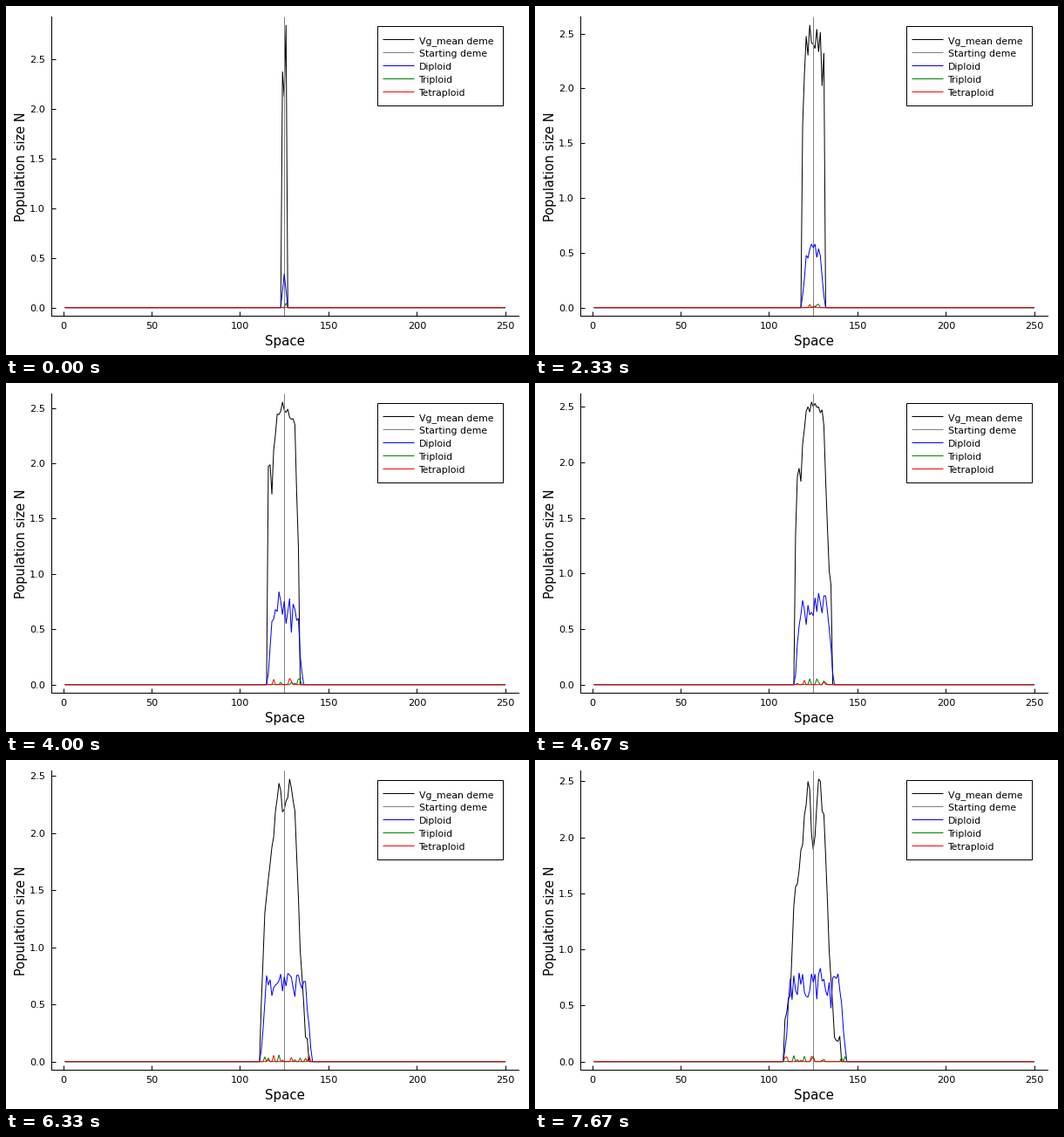
A matplotlib script that plays this animation: 600 px wide and 400 px high, repeating every 8000 ms.

```python
import matplotlib.pyplot as plt
import numpy as np
from matplotlib.animation import FuncAnimation
from matplotlib.patches import Rectangle
from matplotlib.ticker import FormatStrFormatter

W, H, DPI = 600, 400, 100
LOOP_MS, TICK_MS = 8000, 50
GENERATIONS = 24
PX = 72 / DPI
CENTRE = 125
DEMES = np.arange(1, 251)
LEFT, RIGHT, TOP, BOTTOM = 52.4, 588.1, 12, 355.4

plt.rcParams.update({
    "font.family": "DejaVu Sans",
    "font.size": 10.85 * PX,
    "path.simplify": False,
    "lines.linewidth": PX,
    "lines.solid_joinstyle": "miter",
    "lines.solid_capstyle": "butt",
})

# Highest value per generation, which also sets the y axis.
PEAK_POINTS = [(0, 2.84), (3, 2.438), (4, 2.593), (14, 2.545), (17, 2.471),
               (19, 2.472), (21, 2.557), (22, 2.434), (23, 2.521)]
# Variance across space once a deme is settled.
LANDSCAPE = [(109, 0.4), (112, 0.6), (114, 1.4), (118, 1.8), (122, 2.4),
             (125, 2.4), (129, 2.4), (131, 2.1), (134, 1.0), (137, 0.2)]

base_rng = np.random.default_rng(7)
PHASE = base_rng.uniform(0, 2 * np.pi, len(DEMES))
RATE = base_rng.uniform(0.1, 0.4, len(DEMES))


def edge_distance(gen, right_start, right_speed):
    """Demes from the nearer front; zero at the front and outside it."""
    lo = round(123 - 0.65 * gen)
    hi = round(right_start + right_speed * gen)
    return np.clip(np.minimum(DEMES - lo, hi - DEMES), 0, None)


def variance(gen, peak):
    depth = edge_distance(gen, 127.3, 0.6)
    y = np.interp(DEMES, *zip(*LANDSCAPE))
    y -= 0.6 * (gen / 23) ** 4 * np.exp(-((DEMES - CENTRE) / 1.5) ** 2)
    wobble = 0.03 + 0.25 * np.exp(-depth / 2)
    y *= (depth > 0) * (1 + wobble * np.sin(PHASE + RATE * gen))
    return y * peak / y.max()


def diploids(gen, rng):
    depth = edge_distance(gen, 127, 0.72)
    ramp = np.clip(depth / min(4, depth.max()), 0, 1)
    plateau = 0.72 - 0.38 * np.exp(-gen / 8)
    noise = 1 + 0.14 * rng.standard_normal(len(DEMES)) * (gen > 0)
    return plateau * ramp ** 2 * (3 - 2 * ramp) * noise


def specks(occupied, density, rng):
    y = np.zeros(len(DEMES))
    picks = rng.choice(occupied, int(len(occupied) * density), replace=False)
    y[picks] = rng.uniform(0.01, 0.06, len(picks))
    return y


def populations(gen):
    rng = np.random.default_rng(40 + gen)
    peak = np.interp(gen, *zip(*PEAK_POINTS))
    diploid = diploids(gen, rng)
    occupied = np.flatnonzero(diploid > 0)
    triploid = specks(occupied, 0.34 if gen == 0 else 0.25, rng)
    tetraploid = specks(occupied, 0.18, rng)
    return peak, [variance(gen, peak), diploid, triploid, tetraploid]


fig = plt.figure(figsize=(W / DPI, H / DPI), dpi=DPI, facecolor="white")
ax = fig.add_axes([LEFT / W, 1 - BOTTOM / H,
                   (RIGHT - LEFT) / W, (BOTTOM - TOP) / H])
ax.set_xlim(1 - 0.03 * 249, 250 + 0.03 * 249)
ax.set_xticks(range(0, 251, 50))
ax.yaxis.set_major_formatter(FormatStrFormatter("%.1f"))
ax.spines[["top", "right"]].set_visible(False)
ax.spines[["left", "bottom"]].set_linewidth(PX)
ax.tick_params(direction="in", length=5 * PX, width=PX, labelsize=11.2 * PX)
ax.tick_params(axis="x", pad=6.5 * PX)
ax.tick_params(axis="y", pad=7.5 * PX)


def series(color):
    return ax.plot(DEMES, np.zeros(len(DEMES)), color=color,
                   snap=False, zorder=3)[0]


vg_line = series("black")
ax.axvline(CENTRE, color="gray", zorder=3)
lines = [vg_line] + [series(c) for c in ("blue", "green", "red")]

# Fixed labels and legend in stage pixels.
stage = fig.add_axes([0, 0, 1, 1])
stage.set(xlim=(0, W), ylim=(H, 0))
stage.axis("off")
stage.text(320.3, 389, "Space", ha="center", va="baseline",
           fontsize=15 * PX)
stage.text(21.8, 184, "Population size N", rotation=90, ha="center",
           va="baseline", rotation_mode="anchor", fontsize=14.6 * PX)
stage.add_patch(Rectangle((426, 23), 144, 91, facecolor="white",
                          edgecolor="black", linewidth=PX))
LEGEND = [("Vg_mean deme", "black"), ("Starting deme", "gray"),
          ("Diploid", "blue"), ("Triploid", "green"), ("Tetraploid", "red")]
for row, (name, color) in enumerate(LEGEND):
    y = 38 + 15.1 * row
    stage.plot([432, 468], [y, y], color=color)
    stage.text(473.5, y + 4.6, name, va="baseline")


def update(tick):
    # A generation that begins within this tick is shown from its start.
    gen = int((tick + 0.9) * TICK_MS * GENERATIONS / LOOP_MS)
    peak, values = populations(gen)
    for line, y in zip(lines, values):
        line.set_ydata(y)
    ax.set_yticks(np.arange(0, 1.03 * peak, 0.5))
    ax.set_ylim(-0.03 * peak, 1.03 * peak)
    return lines


anim = FuncAnimation(fig, update, frames=LOOP_MS // TICK_MS, interval=TICK_MS,
                     init_func=lambda: update(0), repeat=True, repeat_delay=0)
plt.show()
```
